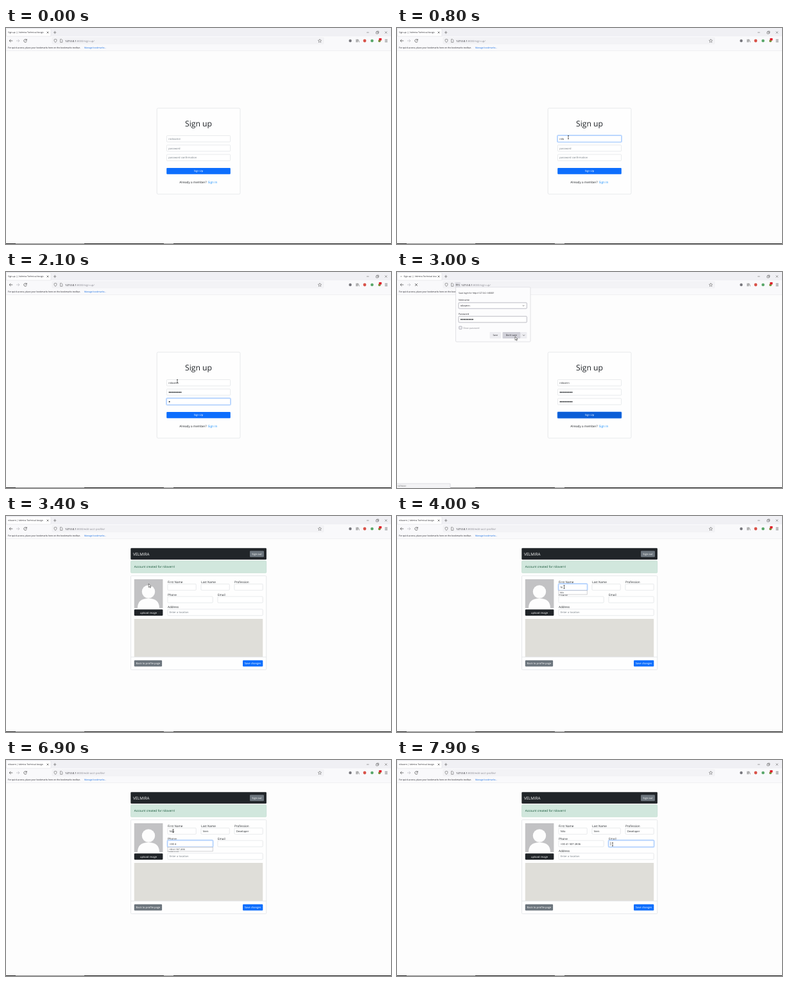
These frames come from a looping animation (600 by 338 pixels, 8000 ms). An HTML page:

```html
<!DOCTYPE html>
<html lang="en">
<head>
<meta charset="utf-8">
<title>Sign up</title>
<style>
html, body { margin: 0; width: 100%; height: 100%; overflow: hidden; background: #fdfdfd; }
svg { display: block; width: 100%; height: 100%; }
text { font-family: "Open Sans", "Noto Sans", sans-serif; text-rendering: geometricPrecision; white-space: pre; }
</style>
</head>
<body>
<svg id="stage" viewBox="0 0 600 338"></svg>
<script>
const LOOP = 8000, STEP = 100;
const BRAND = 'Velmira', LOGIN = 'nilovern', FIRST = 'Nilo', LAST = 'Vern', PHONE = '+00 41 507 2836';
const INK = '#212529', GREY = '#6c757d', BLUE = '#0d6efd', LINK = '#0d8afd', EDGE = '#d9dce0', CHROME = '#f0f0f4';
const stage = document.getElementById('stage');
let t = 0;

const between = (a, b) => t >= a && t < b;
const typed = (s, start, per = STEP) => s.slice(0, Math.max(0, Math.floor((t - start) / per) + 1));
const rect = (x, y, w, h, fill, stroke = 'none', r = 0, extra = '') =>
  `<rect x="${x}" y="${y}" width="${w}" height="${h}" rx="${r}" fill="${fill}" stroke="${stroke}" stroke-width=".6" ${extra}/>`;
const text = (x, y, s, size = 4.1, fill = INK, extra = '') =>
  `<text x="${x}" y="${y}" font-size="${size}" fill="${fill}" ${extra}>${s}</text>`;
const mid = (x, y, s, size, fill) => text(x, y, s, size, fill, 'text-anchor="middle"');
const path = (d, stroke = '#444', width = .7, fill = 'none') =>
  `<path d="${d}" stroke="${stroke}" stroke-width="${width}" fill="${fill}"/>`;
const dot = (x, y, r, fill, stroke = 'none') =>
  `<circle cx="${x}" cy="${y}" r="${r}" fill="${fill}" stroke="${stroke}" stroke-width=".7"/>`;
const button = (x, y, w, label, fill) =>
  rect(x, y, w, 9.8, fill, 'none', 1.2) + mid(x + w / 2, y + 6.4, label, 4.1, '#fff');
const bullets = (x, y, n) => Array.from({length: n}, (_, i) => dot(x + 1.2 + i * 2.55, y, 1, INK)).join('');

// Focus is [from, to]; the caret blinks while the field is empty.
function field(x, y, w, value, hint, [from, to] = [0, 0], secret) {
  const on = between(from, to);
  let s = on ? rect(x - .7, y - .7, w + 1.4, 11.2, 'none', '#c2dbfe', 1.8, 'style="stroke-width:1.4"') : '';
  s += rect(x, y, w, 9.8, '#fff', on ? '#86b7fe' : EDGE, 1.2);
  if (!value) s += text(x + 2.8, y + 6.5, hint, 4.1, GREY);
  else s += secret ? bullets(x + 3, y + 5.2, value.length) : text(x + 2.8, y + 6.5, value);
  if (on && !value && (t - from) % 400 < 200) s += path(`M${x + 2.9} ${y + 2.3}v5.3`, INK, .5);
  return s;
}

const suggestion = (x, y, w, h, value) =>
  rect(x, y, w, h, '#fff', '#b4b4b8') + text(x + 2, y + h - 1.9, value, 3.3);

function browser() {
  const profile = t >= 3400, loading = between(2600, 3400);
  const title = `${profile ? LOGIN + ' |' : 'Sign up ||'} ${BRAND} Technical Assign`;
  let s = rect(0, 0, 600, 13, CHROME) + rect(0, 13, 600, 22.5, '#f9f9fb') + rect(.5, 1, 69.5, 12, '#fff', '#dcdce2', 1);
  s += `<clipPath id="tab"><path d="M0 0H61.5V13H0Z"/></clipPath><g clip-path="url(#tab)">` +
    text(loading ? 10.5 : 3, 8.3, title, 3.4, '#15141a') + '</g>';
  if (loading) s += dot(5 + Math.sin(t / 150) * 1.5, 7, .7, '#777');
  s += path('M63.6 5.6l2.8 2.8m0-2.8l-2.8 2.8', '#333', .6) + path('M74 7h4.4M76.2 4.8v4.4', '#555', .6);
  s += path('M562 7h3.6', '#444', .5) + path('M576.8 6h3v3h-3zM577.8 6v-1h3v3h-1', '#444', .5) +
    path('M590.6 5.4l3.2 3.2m0-3.2l-3.2 3.2', '#444', .5);
  s += path('M10.3 20H5.2m2.2-2.2L5.2 20l2.2 2.2') + path('M16 20h5m-2.2-2.2L21 20l-2.2 2.2', '#b5b5ba');
  s += loading ? path('M28 18l4 4m0-4l-4 4') : path('M32 18.7a2.3 2.3 0 1 0 .3 2M32.3 17.2v2h-2');
  s += rect(72, 15, 423, 10, '#f3f3f6', '#ededf0', 1.2);
  s += path('M77 17.4l2 .7c0 2.3-.5 3.6-2 4.5-1.5-.9-2-2.2-2-4.5z', '#666', .6) +
    path('M84.6 17.6h2l1.2 1.2v3.6h-3.2z', '#666', .6);
  if (loading) s += rect(90.5, 16, 8.3, 8, '#dedee4', 'none', 1) + dot(93, 20, 1, 'none', '#666') + path('M94 20h3.4v1.2', '#666');
  s += text(loading ? 100 : 92, 21.6,
    '127.0.0.1<tspan fill="#8a8a92">:8000/' + (profile ? 'edit-acct-profile/' : 'sign-up/') + '</tspan>', 4.2, '#15141a');
  s += path('M489 17.4l.8 1.7 1.9.2-1.4 1.3.4 1.9-1.7-1-1.7 1 .4-1.9-1.4-1.3 1.9-.2z', '#555', .5);
  s += dot(536.5, 20, 2.2, '#77777d') + path('M546 17.7v4.6m1.5-4.6v4.6m1.3-4.5l1.5 4.5', '#555');
  s += dot(559, 20, 2.4, '#d9534a') + dot(570.5, 20, 2.3, '#57a668') + dot(582, 20.2, 2, '#78953f') +
    rect(581.2, 16, 4.2, 3.6, '#e0202c', 'none', .6);
  s += path('M590.5 18.2h4M590.5 20h4M590.5 21.8h4', '#444', .6);
  s += text(3, 32.2, 'For quick access, place your bookmarks here on the bookmarks toolbar.', 3.38, '#15141a') +
    text(122, 32.2, 'Manage bookmarks...', 3.4, '#0061e0');
  s += path('M0 35.6H600', '#e2e2e6', .5);
  s += rect(0, 337, 600, 1, '#222') + rect(15, 337, 107, 1, '#8d8d8d') + rect(246, 337, 15, 1, '#999');
  if (loading) s += rect(-1, 331, 84, 8, '#f3f3f5', '#cfcfd4', .8) + text(1, 336.2, '127.0.0.1', 3.2, '#333');
  return s;
}

function loginMenu(y) {
  const key = ky => dot(253.4, ky, .9, 'none', '#777') + path(`M254.3 ${ky}h2.6v1`, '#777', .5);
  const bold = 'font-weight="600"';
  return rect(250.4, y, 99.2, 42.4, '#fff', '#b4b4b8') +
    key(y + 3.5) + text(258, y + 4.9, 'tolvanek', 3.3, INK, bold) + text(258, y + 10.4, 'From this web site', 3.3, GREY) +
    path(`M250.5 ${y + 12.8}h99`, '#d6d6da', .5) +
    key(y + 16.8) + text(258, y + 18.1, 'Use a Securely Generated Password', 3.2, INK, bold) +
    text(258, y + 23.7, 'YdtXrUNdLV3bN59', 3.3, '#8a8a8e') +
    text(258, y + 30, 'Firefox will save this password for this web site.', 2.95, '#8a8a8e') +
    rect(250.4, y + 32.3, 99.2, 10.1, '#e6e6ea', '#b4b4b8') + mid(300, y + 38.6, 'View Saved Logins', 3.5, INK);
}

function savePopup() {
  const ink = '#15141a';
  return rect(91.5, 23.8, 116.5, 85.4, '#fcfcfd', '#d0d0d6', 1.4) +
    text(96, 33.6, 'Save login for http://127.0.0.1:8000?', 3.3, ink) +
    text(96, 45, 'Nickname', 3.6, ink) + rect(96, 48, 106.3, 9.2, '#fff', '#8f8f9d', 1) +
    text(98.8, 54, LOGIN, 3.9, ink) + path('M195.7 52l1.4 1.4 1.4-1.4', '#444', .6) +
    text(96, 67, 'Password', 3.6, ink) + rect(96, 69.3, 106.3, 9.6, '#fff', '#8f8f9d', 1) + bullets(98.8, 74.2, 8) +
    rect(96.7, 85, 4.4, 4.4, '#ededf0', '#8f8f9d', .6) + text(103, 88.6, 'Show password', 3.5, '#85858c') +
    rect(144.5, 94, 17.5, 10, '#ededf1', 'none', 1) + mid(153.2, 100.4, 'Save', 3.5, ink) +
    rect(164.5, 94, 28, 10, '#d0d0d8', 'none', 1) + mid(178.3, 100.4, "Don't save", 3.5, ink) +
    rect(192.9, 94, 9.6, 10, '#ededf1', 'none', 1) + path('M196.1 98.3l1.5 1.5 1.5-1.5', '#333', .6);
}

function signUp() {
  const pressed = t >= 2600;
  let s = rect(235.2, 125.4, 129.8, 134.6, '#fefefe', EDGE, 2) + mid(300, 153.8, 'Sign up', 12.2, INK);
  s += field(250.4, 168.4, 99.2, typed(LOGIN, 500), 'nickname', [400, 1300]);
  s += field(250.4, 183.1, 99.2, typed('........', 1600, 50), 'password', [1300, 2000], true);
  s += field(250.4, 197.9, 99.2, typed('........', 2100, 50), 'password confirmation', [2000, 2600], true);
  if (pressed) s += rect(249.3, 218.2, 101.4, 11.2, '#9ec5fe', 'none', 2);
  s += button(250.2, 218.9, 99.6, 'Sign Up', pressed ? '#0b5ed7' : BLUE);
  s += text(270.3, 243, 'Already a member?', 4.72) + text(314.8, 243, 'Sign In', 4.7, LINK);
  if (between(1300, 1600)) s += loginMenu(193.8);
  return s + (between(2700, 3200) ? savePopup() : '');
}

function profilePage() {
  const first = t < 4100 ? typed(FIRST[0], 3900) : FIRST;
  const phone = t < 7300 ? typed(PHONE.slice(0, 6), 6500) : PHONE;
  const label = (x, y, s) => text(x, y, s, 4.6);
  let s = rect(194.3, 50.2, 211.6, 18, INK, 'none', 1.2) + text(198, 61.9, BRAND.toUpperCase(), 6.2, '#fff') +
    button(380, 54.4, 22, 'Sign out', GREY);
  s += rect(194.5, 70.2, 211.2, 18.8, '#d1e7dd', '#badbcc', 1.2) + text(199.8, 81.4, `Account created for ${LOGIN}!`, 4.72, '#0f5132');
  s += rect(194.5, 93.6, 211.2, 147, '#fefefe', EDGE, 1.2);
  s += rect(199.8, 99, 44.6, 45, '#c2c2c4') + dot(222, 118.5, 10.2, '#fdfdfd') +
    path('M205 144C205 134 211 129 222 129S239 134 239 144Z', 'none', 0, '#fdfdfd');
  s += button(199.8, 146.2, 44.6, 'upload image', INK);
  s += label(252, 104.7, 'First Name') + label(304, 104.7, 'Last Name') + label(356, 104.7, 'Profession') +
    label(252, 124.6, 'Phone') + label(330, 124.6, 'Email') + label(252, 144.2, 'Address');
  s += field(252, 106.4, 44.2, first, '', [3700, 4500]);
  s += field(304, 106.4, 44.2, typed(LAST, 4700), '', [4500, 5100]);
  s += field(356, 106.4, 44.2, typed('Developer', 5500, 70), '', [5100, 6300]);
  s += field(252, 126, 70.2, phone, '', [6300, 7800]);
  s += field(330, 126, 70.2, '', '', [7800, LOOP]);
  s += field(252, 145.9, 148.2, '', 'Enter a location');
  s += rect(199.8, 161, 200.4, 59.5, '#dfded9') + path('M194.5 220.7H405.7', EDGE, .6);
  s += button(199.8, 225.7, 43.3, 'Back to profile page', GREY) + button(369, 225.7, 31.3, 'Save changes', BLUE);
  if (between(3900, 4100)) s += suggestion(252, 116.6, 44.2, 6.3, FIRST);
  if (between(6500, 7300)) s += suggestion(252, 136.3, 70.2, 6.6, PHONE);
  return s;
}

const route = [[200, 320, 205], [400, 267, 171], [2300, 267, 171], [2500, 300, 225], [2700, 300, 225],
  [2900, 184, 101], [3200, 184, 101], [3600, 260.5, 111], [7400, 260.5, 111], [7700, 336, 132], [LOOP, 336, 132]];

function pointer() {
  const i = route.findIndex(p => p[0] > t);
  if (i < 1) return '';
  const [a, ax, ay] = route[i - 1], [b, bx, by] = route[i];
  const k = (t - a) / (b - a), x = ax + (bx - ax) * k, y = ay + (by - ay) * k;
  return between(2400, 3500)
    ? path(`M${x} ${y}v5.6l1.4-1.2.9 2 .9-.4-.9-2h1.8z`, '#111', .5, '#fff')
    : path(`M${x - 1} ${y - 2.5}h2m-1 0v5m-1 0h2`, '#111', .6);
}

let shown = -1;
function draw(now) {
  t = Math.floor(now % LOOP / STEP) * STEP;
  if (t !== shown) {
    shown = t;
    stage.innerHTML = rect(0, 0, 600, 338, '#fdfdfd') + browser() + (t < 3400 ? signUp() : profilePage()) + pointer();
  }
  requestAnimationFrame(draw);
}
draw(performance.now());
</script>
</body>
</html>
```
